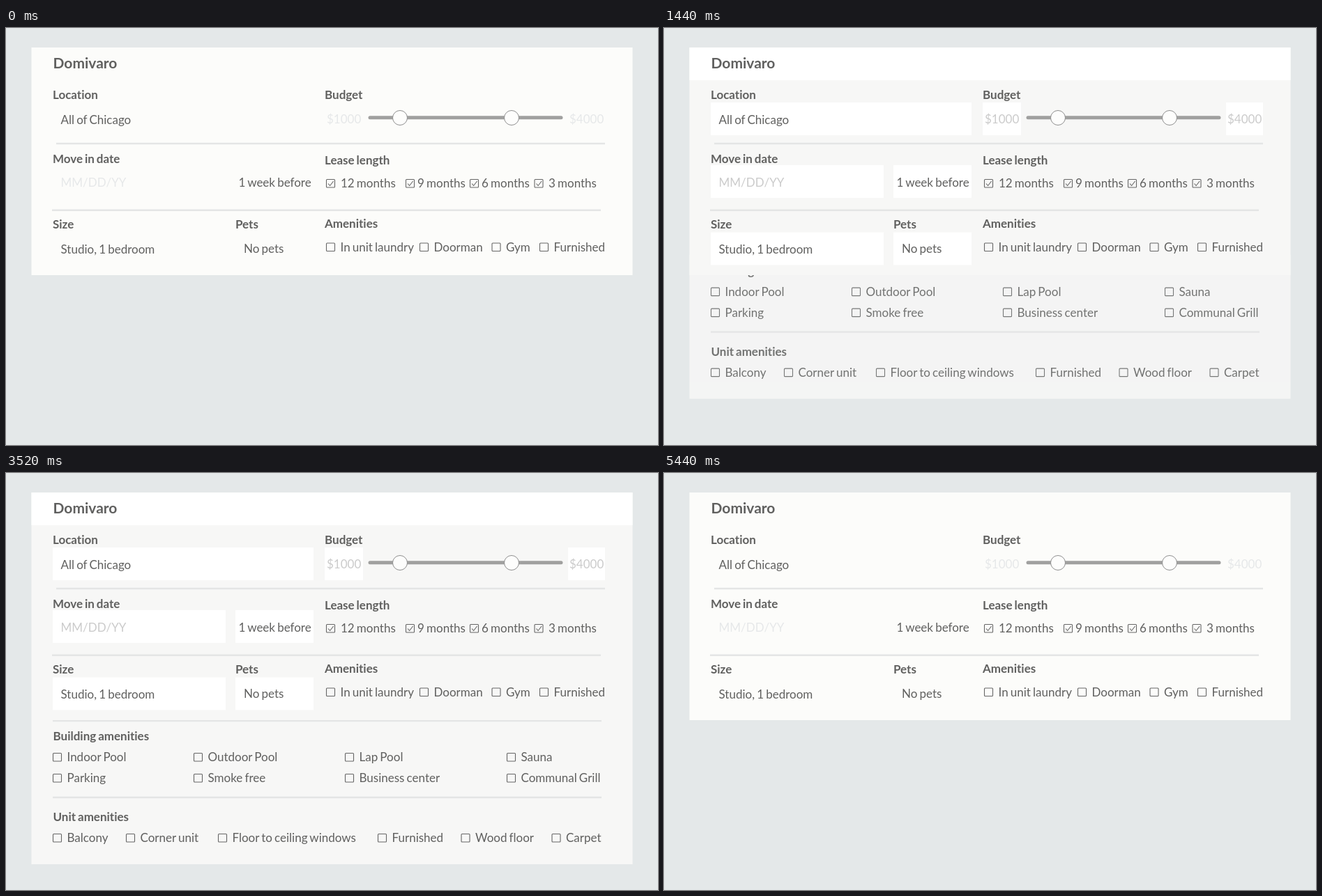
Write an HTML page that moves like this. It is 935 px wide and 599 px high and loops after 5.46 s.

```html
<!DOCTYPE html>
<html lang="en">
<head>
<meta charset="utf-8">
<title>Apartment filters</title>
<style>
  html, body { margin: 0; width: 100%; height: 100%; overflow: hidden; background: #e4e8e9; }
  svg { display: block; width: 935px; height: 599px; }
  text { font: 17px Lato, sans-serif; fill: #60605f; word-spacing: -1.2px; font-variant-ligatures: none; }
  .label { font-weight: 700; }
  .title { font-weight: 700; font-size: 21px; }
  .hint { fill: var(--hint); }
  .field { fill: #fff; }
  .rule { stroke: #e4e5e5; stroke-width: 2.4; }
  .box, .tick { fill: none; stroke: #666; stroke-width: 1.1; }
  .track { stroke: #a0a09f; stroke-width: 5; stroke-linecap: round; }
  .knob { fill: #fdfdfc; stroke: #8f8f8f; }
</style>
</head>
<body>
<svg viewBox="0 0 935 599">
  <rect id="stage" width="935" height="599"/>
  <g id="panel"></g>
  <g id="card"></g>
  <g id="fields"></g>
  <g id="form"></g>
</svg>
<script>
const $ = id => document.getElementById(id);
const [stage, panel, card, fields, form] = ['stage', 'panel', 'card', 'fields', 'form'].map($);

function add(parent, tag, attrs, text) {
  const el = document.createElementNS('http://www.w3.org/2000/svg', tag);
  for (const key in attrs) el.setAttribute(key, attrs[key]);
  if (text) el.textContent = text;
  parent.append(el);
  return el;
}
const write = (parent, x, y, text, cls = '') => add(parent, 'text', { x, y, class: cls }, text);
const rect = (parent, x, y, width, height, cls = '') => add(parent, 'rect', { x, y, width, height, class: cls });
const line = (parent, x1, x2, y, cls = 'rule') => add(parent, 'line', { x1, x2, y1: y, y2: y, class: cls });

function option(parent, x, baseline, text, textX = x + 20.5, checked = false) {
  const y = baseline - 12;
  add(parent, 'rect', { x: x + .5, y: y + .5, width: 12, height: 11.5, rx: 1, class: 'box' });
  if (checked) add(parent, 'path', { d: `M${x + 3} ${y + 6.5}l2.6 3 5-6.5`, class: 'tick' });
  write(parent, textX, baseline, text);
}

// Sliding panel
rect(panel, 36.5, 355, 862, 207).setAttribute('fill', '#f7f7f6');
line(panel, 67, 854, 356);
write(panel, 67.5, 384, 'Building amenities', 'label');
[['Indoor Pool', 'Outdoor Pool', 'Lap Pool', 'Sauna'],
 ['Parking', 'Smoke free', 'Business center', 'Communal Grill']].forEach((row, r) =>
  row.forEach((name, c) => option(panel, [67, 269, 486, 718][c], 414 + 30 * r, name)));
line(panel, 67, 854, 466);
write(panel, 67.5, 500, 'Unit amenities', 'label');
[[67, 'Balcony'], [172, 'Corner unit'], [304, 'Floor to ceiling windows'],
 [533, 'Furnished'], [652.5, 'Wood floor'], [782.5, 'Carpet']]
  .forEach(([x, name]) => option(panel, x, 530, name));

// Filter card
const cardBack = rect(card, 36.5, 28, 862, 327);
rect(fields, 36.5, 28, 862, 47, 'field');
[[67, 107, 374], [457, 107, 55], [806, 107, 53], [67, 197, 248],
 [329, 197, 112], [67, 293.5, 248], [329, 293.5, 112]]
  .forEach(([x, y, w]) => rect(fields, x, y, w, 47, 'field'));

write(form, 67.5, 58, 'Domivaro', 'title');
[[67, 102, 'Location'], [457, 102, 'Budget'], [67, 193.5, 'Move in date'], [457, 195.5, 'Lease length'],
 [67, 288, 'Size'], [329, 288, 'Pets'], [457, 287, 'Amenities']]
  .forEach(([x, y, name]) => write(form, x, y, name, 'label'));
[[78.5, 137.5, 'All of Chicago'], [333.5, 227.5, '1 week before'],
 [78.5, 323.5, 'Studio, 1 bedroom'], [341, 323, 'No pets']]
  .forEach(([x, y, value]) => write(form, x, y, value));
[[460, 136.5, '$1000'], [808, 136.5, '$4000'], [78.5, 227.5, 'MM/DD/YY']]
  .forEach(([x, y, value]) => write(form, x, y, value, 'hint'));
line(form, 72, 859, 166);
line(form, 66, 853, 261.8);
line(form, 522, 796, 128.8, 'track');
for (const cx of [565, 725]) add(form, 'circle', { cx, cy: 129, r: 10.5, class: 'knob' });
[[459, '12 months', 480], [573, '9 months', 590], [665, '6 months', 682], [757.5, '3 months', 778]]
  .forEach(([x, name, textX]) => option(form, x, 229, name, textX, true));
[[459, 'In unit laundry'], [593, 'Doorman'], [696.5, 'Gym'], [765, 'Furnished']]
  .forEach(([x, name]) => option(form, x, 320.5, name));

const LOOP = 5460, OPEN = 1244, CLOSE = 4229.5, DURATION = 350, TRAVEL = 207;

// Cubic bezier (.25, .1, .25, 1)
function ease(x) {
  if (x <= 0) return 0;
  if (x >= 1) return 1;
  const curve = (s, a, b) => 3 * s * (1 - s) ** 2 * a + 3 * s * s * (1 - s) * b + s ** 3;
  let lo = 0, hi = 1;
  for (let i = 0; i < 24; i++) {
    const mid = (lo + hi) / 2;
    if (curve(mid, .25, .25) < x) lo = mid; else hi = mid;
  }
  return curve(lo, .1, 1);
}

// Card shades switch in steps with how far the panel is open
const looks = {
  closed: { bg: '#e4e8e9', card: '#fcfcfa', hint: '#e6e8e9' },
  half: { bg: '#e6e8e9', card: '#fcfcfc', hint: '#cbcbcb' },
  open: { bg: '#e4e8e9', card: '#f7f7f6', hint: '#cbcbcb' }
};

function draw(now) {
  const t = now % LOOP;
  const p = ease((t - OPEN) / DURATION) - ease((t - CLOSE) / DURATION);
  const state = p > .7 ? 'open' : p > .03 ? 'half' : 'closed';
  const look = looks[state];
  stage.setAttribute('fill', look.bg);
  cardBack.setAttribute('fill', look.card);
  form.style.setProperty('--hint', look.hint);
  fields.style.display = state === 'open' ? '' : 'none';
  panel.setAttribute('transform', `translate(0 ${(p - 1) * TRAVEL})`);
  panel.setAttribute('opacity', p);
}

const start = performance.now();
function tick() {
  draw(performance.now() - start);
  requestAnimationFrame(tick);
}
tick();
</script>
</body>
</html>
```
